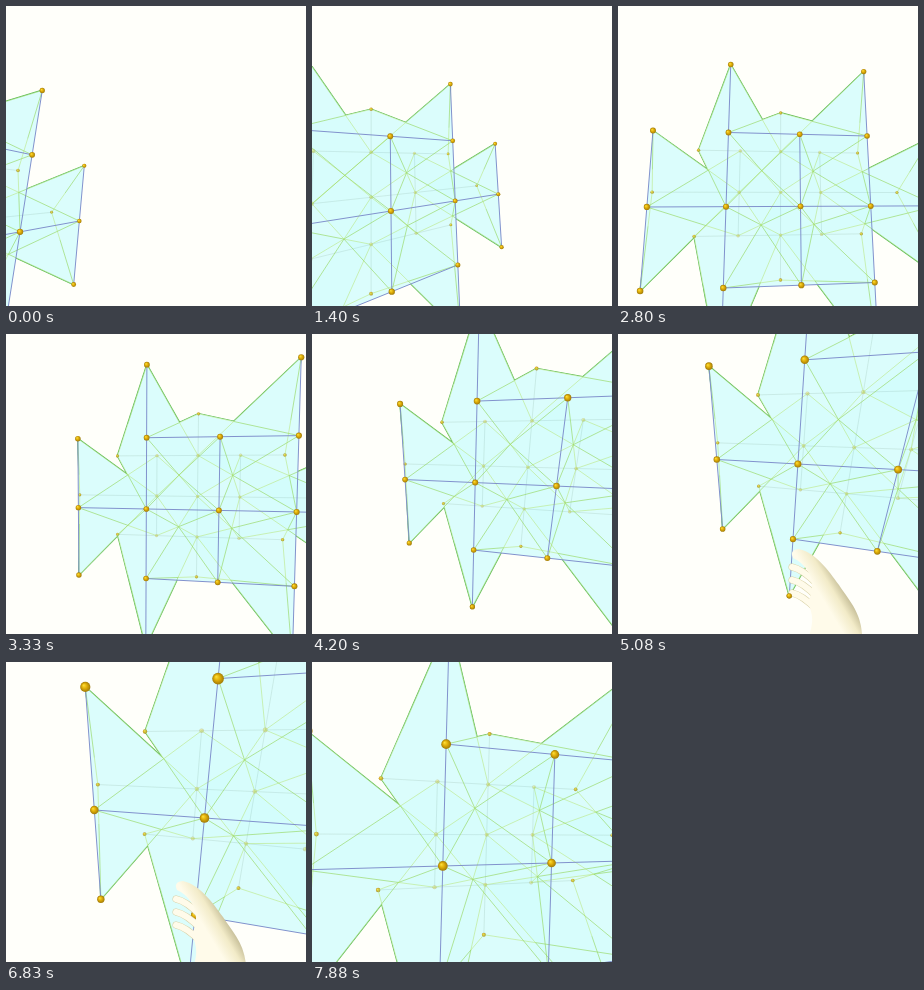
An HTML page with a canvas that plays this animation: 300 px wide and 300 px high, repeating every 8 s.

```html
<!DOCTYPE html>
<html lang="en">
<head>
<meta charset="utf-8">
<title>Lattice</title>
<style>
html, body { margin: 0; width: 100%; height: 100%; overflow: hidden; background: #fffffa; }
canvas { display: block; width: 100vw; height: 100vh; }
</style>
</head>
<body>
<canvas id="stage" width="300" height="300"></canvas>
<script>
const ctx = document.getElementById('stage').getContext('2d');
const LOOP = 8000, STEP = 175, FOCAL = 175, MID = 150, LAYER = 0.95, NEAR = 0.15;
const { sin, cos } = Math;

// Camera path: where the lattice centre lies and how the lattice is turned
const poses = [
  { t: 0, x: -362.5, y: 132.5, depth: 1.301, yaw: 1.154, pitch: 0.565, roll: 0.525 },
  { t: 1400, x: -163.8, y: 126.9, depth: 2.307, yaw: 0.601, pitch: 0.107, roll: 0.015 },
  { t: 2100, x: -56.5, y: 178.8, depth: 2.353, yaw: 0.366, pitch: 0.234, roll: 0.029 },
  { t: 3325, x: 150.5, y: 63.2, depth: 2.392, yaw: -0.082, pitch: -0.03, roll: 0.008 },
  { t: 5075, x: 229.6, y: -25.4, depth: 1.765, yaw: -0.209, pitch: -0.333, roll: 0.082 },
  { t: 6825, x: 242.7, y: 20.8, depth: 1.285, yaw: -0.177, pitch: -0.268, roll: 0.07 },
  { t: 7875, x: 144.6, y: 82.3, depth: 1.6145, yaw: 0.177, pitch: -0.005, roll: 0.027 }
];

// Tetrahedra: a front edge on layer 0, a crossing back edge on layer 2
const tetras = [];
for (let x = -1; x <= 3; x++) for (let y = -1; y <= 1; y++) {
  if (Math.abs(x - 1) + Math.abs(y) > 2) continue;
  const upright = (x + y) & 1;
  const pair = (vertical, z) => vertical
    ? [[x, y - 1, z], [x, y + 1, z]]
    : [[x - 1, y, z], [x + 1, y, z]];
  tetras.push({ front: pair(upright, 0), back: pair(!upright, 2), centre: [x, y, 0] });
}
const unique = list => [...new Map(list.map(p => [p.join(), p])).values()];
const frontNodes = unique(tetras.flatMap(s => [...s.front, s.centre]));
const backNodes = unique(tetras.flatMap(s => s.back));

const clamp = u => Math.max(0, Math.min(1, u));
const ease = u => { u = clamp(u); return u * u * (3 - 2 * u); };
const lerp = (a, b, u) => a.map((v, i) => v + (b[i] - v) * u);

// Monotone cubic path through the poses, coming to rest at the last
function speed(i, key) {
  const rate = j => (poses[j + 1][key] - poses[j][key]) / (poses[j + 1].t - poses[j].t);
  if (i === 0) return rate(0);
  if (i === poses.length - 1) return 0;
  const a = rate(i - 1), b = rate(i);
  return a * b > 0 ? 2 * a * b / (a + b) : 0;
}

function poseAt(t) {
  let i = 0;
  while (i < poses.length - 2 && t >= poses[i + 1].t) i++;
  const p = poses[i], q = poses[i + 1], h = q.t - p.t, u = (t - p.t) / h, v = 1 - u;
  return key => p[key] + (q[key] - p[key]) * ease(u)
    + h * u * v * (speed(i, key) * v - speed(i + 1, key) * u);
}

function camera(t) {
  const pose = poseAt(t);
  const [yaw, pitch, roll] = ['yaw', 'pitch', 'roll'].map(pose);
  const right = [cos(yaw) * cos(roll), cos(yaw) * sin(roll), sin(yaw)];
  const rise = [sin(roll), -cos(roll), 0];
  const ahead = [-sin(yaw) * cos(roll), -sin(yaw) * sin(roll), cos(yaw)];
  const up = rise.map((v, k) => v * cos(pitch) + ahead[k] * sin(pitch));
  const away = rise.map((v, k) => ahead[k] * cos(pitch) - v * sin(pitch));
  const origin = [pose('x') / FOCAL, pose('y') / FOCAL, pose('depth')];
  return ([x, y, z]) => origin.map((v, k) =>
    v + (x - 1) * right[k] + y * up[k] + z * LAYER * away[k]);
}

const flat = p => [MID + FOCAL * p[0] / p[2], MID + FOCAL * p[1] / p[2]];

function clip(pts) {
  const out = [];
  pts.forEach((p, i) => {
    const q = pts[(i + 1) % pts.length];
    if (p[2] >= NEAR) out.push(p);
    if ((p[2] < NEAR) !== (q[2] < NEAR)) out.push(lerp(p, q, (NEAR - p[2]) / (q[2] - p[2])));
  });
  return out;
}

function trace(pts) {
  const seen = clip(pts);
  ctx.beginPath();
  seen.forEach(p => ctx.lineTo(...flat(p)));
  return seen.length > 1;
}

function line(a, b, color, width) {
  if (!trace([a, b])) return;
  ctx.strokeStyle = color;
  ctx.lineWidth = width;
  ctx.stroke();
}

function fill(pts, color) {
  if (!trace(pts)) return;
  ctx.fillStyle = color;
  ctx.fill();
}

function ball(p, alpha = 1) {
  if (p[2] < NEAR) return;
  const [x, y] = flat(p), r = Math.min(7 / p[2], 9);
  const g = ctx.createRadialGradient(x - r * 0.35, y - r * 0.35, 0, x, y, r);
  g.addColorStop(0, '#ffe23c');
  g.addColorStop(0.5, '#e0ae08');
  g.addColorStop(1, '#a07a08');
  ctx.globalAlpha = alpha;
  ctx.fillStyle = g;
  ctx.beginPath();
  ctx.arc(x, y, r, 0, 7);
  ctx.fill();
  ctx.globalAlpha = 1;
}

function hand(t) {
  const hidden = 1 - ease((t - 4400) / 500) + ease((t - 6850) / 450);
  const drift = ease((t - 5075) / 1750);
  ctx.save();
  ctx.translate(-4 * drift, 4 * drift + 95 * hidden);
  ctx.lineCap = 'round';
  for (let i = 0; i < 3; i++) {
    const y = 233 + i * 13;
    for (const [color, width] of [['#d8d0a4', 7], ['#fffbea', 6]]) {
      ctx.strokeStyle = color;
      ctx.lineWidth = width;
      ctx.beginPath();
      ctx.moveTo(174, y);
      ctx.quadraticCurveTo(184, y + 2, 198, y + 16);
      ctx.stroke();
    }
  }
  const g = ctx.createLinearGradient(204, 264, 229, 249);
  g.addColorStop(0, '#fffbea');
  g.addColorStop(0.45, '#f2ebc8');
  g.addColorStop(1, '#aca47c');
  ctx.fillStyle = g;
  ctx.beginPath();
  ctx.moveTo(175, 224);
  ctx.quadraticCurveTo(171, 216, 181, 215);
  ctx.bezierCurveTo(198, 219, 210, 236, 221, 251);
  ctx.bezierCurveTo(230, 265, 245, 280, 244, 305);
  ctx.lineTo(190, 305);
  ctx.bezierCurveTo(197, 285, 194, 280, 190, 268);
  ctx.bezierCurveTo(199, 250, 192, 232, 175, 224);
  ctx.fill();
  ctx.restore();
}

function draw(t) {
  const at = camera(t);
  const solids = tetras.map(s => ({ front: s.front.map(at), back: s.back.map(at) }));
  const sides = solids.flatMap(({ front, back }) => front.flatMap(a => back.map(b => [a, b])));
  const faces = solids.flatMap(({ front: [a, b], back: [c, d] }) =>
    [[a, b, c], [a, b, d], [c, d, a], [c, d, b]]);

  ctx.fillStyle = '#fffffa';
  ctx.fillRect(0, 0, 300, 300);

  // Dark strokes under the fill survive only along the outline
  for (const side of sides) line(...side, '#5cb85c', 1.7);
  for (const f of faces) fill(f, '#dffdfc');

  for (const { back } of solids) line(...back, 'rgba(185,215,205,0.6)', 0.8);
  for (const p of backNodes) {
    const outer = p[0] < 0 || p[0] > 2 || Math.abs(p[1]) > 1;
    ball(at(p), outer ? 0.85 : 0.35);
  }
  for (const f of faces) fill(f, 'rgba(120,235,240,0.022)');
  for (const [a, b] of sides) {
    const m = lerp(a, b, 0.5);
    line(m, b, 'rgba(180,226,100,0.6)', 0.8);
    line(a, m, 'rgba(150,215,95,0.8)', 0.8);
  }
  for (const { front } of solids) line(...front, '#7886c8', 0.9);
  for (const p of frontNodes) ball(at(p));
  hand(t);
  ball(at([0, -2, 0]));
}

function frame(now) {
  draw(Math.floor((now % LOOP) / STEP) * STEP);
  requestAnimationFrame(frame);
}
requestAnimationFrame(frame);
</script>
</body>
</html>
```
